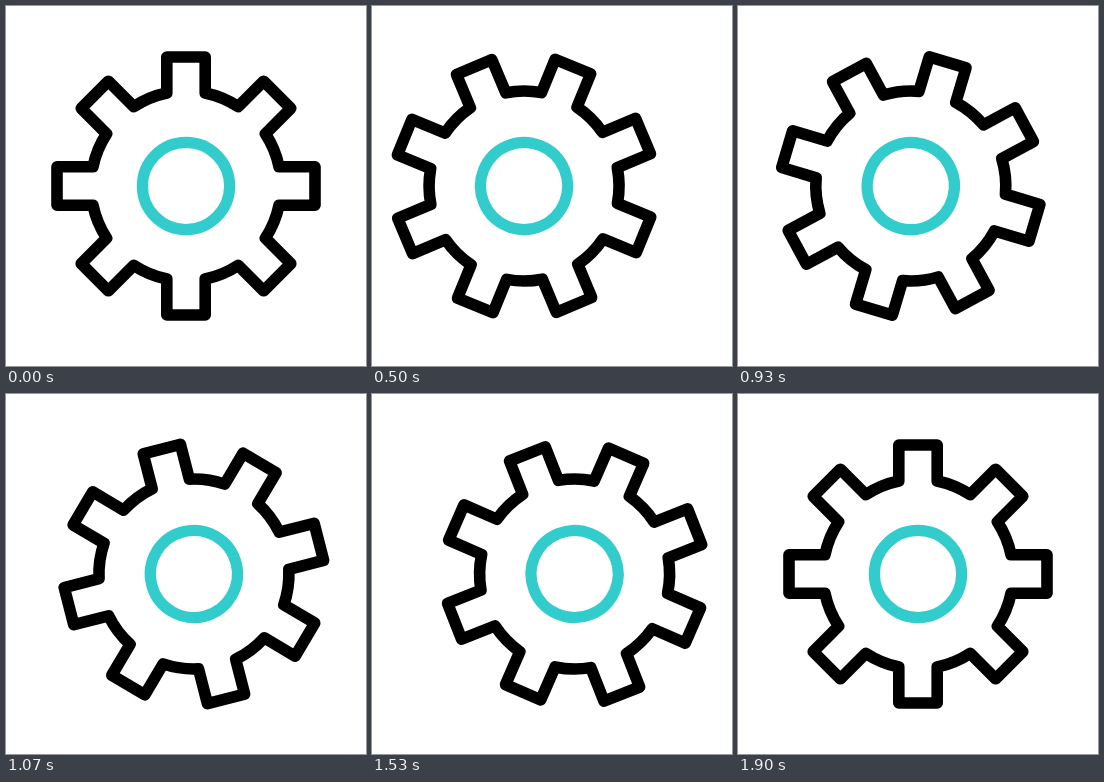
Animation of 360 by 360 pixels, one loop 2 s. Source, as an HTML page:

```html
<!DOCTYPE html>
<html lang="en">
<head>
<meta charset="utf-8">
<title>Rolling gear</title>
<style>
  html, body { margin: 0; width: 100%; height: 100%; overflow: hidden; background: #fff; }
  svg { display: block; width: 100%; height: 100%; }
  #gear { fill: none; stroke-linejoin: round; }
</style>
</head>
<body>
<svg viewBox="0 0 360 360">
  <g id="gear" transform="translate(180 180)">
    <path id="teeth" stroke="#000" stroke-width="11.6"/>
    <circle r="43.6" stroke="#33cccc" stroke-width="11.2"/>
  </g>
</svg>
<script>
  const TEETH = 8, BODY = 95, TIP = 129, HALF = 19.2;
  const LOOP = 2000, FPS = 30, LAST = 57;

  // Poses in 1/30 s steps; the last turn equals rest by the eightfold symmetry.
  const poses = [
    { at: 0, x: 0, turn: 0 },
    { at: 18.1, x: -30.3, turn: -73.5 },
    { at: 41.3, x: 28.8, turn: 157 },
    { at: LAST, x: 0, turn: -45 }
  ];

  const gear = document.getElementById('gear');

  function gearPath() {
    const base = Math.sqrt(BODY * BODY - HALF * HALF);
    const tooth = [[-HALF, -base], [-HALF, -TIP], [HALF, -TIP], [HALF, -base]];
    let d = '';
    for (let i = 0; i < TEETH; i++) {
      const a = i * 2 * Math.PI / TEETH, c = Math.cos(a), s = Math.sin(a);
      const points = tooth.map(([x, y]) =>
        (x * c - y * s).toFixed(2) + ' ' + (x * s + y * c).toFixed(2));
      d += (i ? `A${BODY} ${BODY} 0 0 1 ` : 'M') + points.join('L');
    }
    const close = (-HALF).toFixed(2) + ' ' + (-base).toFixed(2);
    return d + `A${BODY} ${BODY} 0 0 1 ${close}Z`;
  }

  const ease = s => s * s * (3 - 2 * s);
  const mix = (a, b, k) => a + (b - a) * k;

  function draw(ms) {
    // Steps fall on hundredths of a second, hence the 5 ms rounding.
    const step = Math.min(LAST, Math.floor((ms % LOOP + 5) * FPS / 1000));
    const i = Math.max(1, poses.findIndex(p => step <= p.at));
    const from = poses[i - 1], to = poses[i];
    const k = ease((step - from.at) / (to.at - from.at));
    const x = 180 + mix(from.x, to.x, k);
    gear.setAttribute('transform',
      `translate(${x} 180) rotate(${mix(from.turn, to.turn, k)})`);
  }

  document.getElementById('teeth').setAttribute('d', gearPath());

  let start;
  function tick(now) {
    start ??= now;
    draw(now - start);
    requestAnimationFrame(tick);
  }
  requestAnimationFrame(tick);
</script>
</body>
</html>
```
